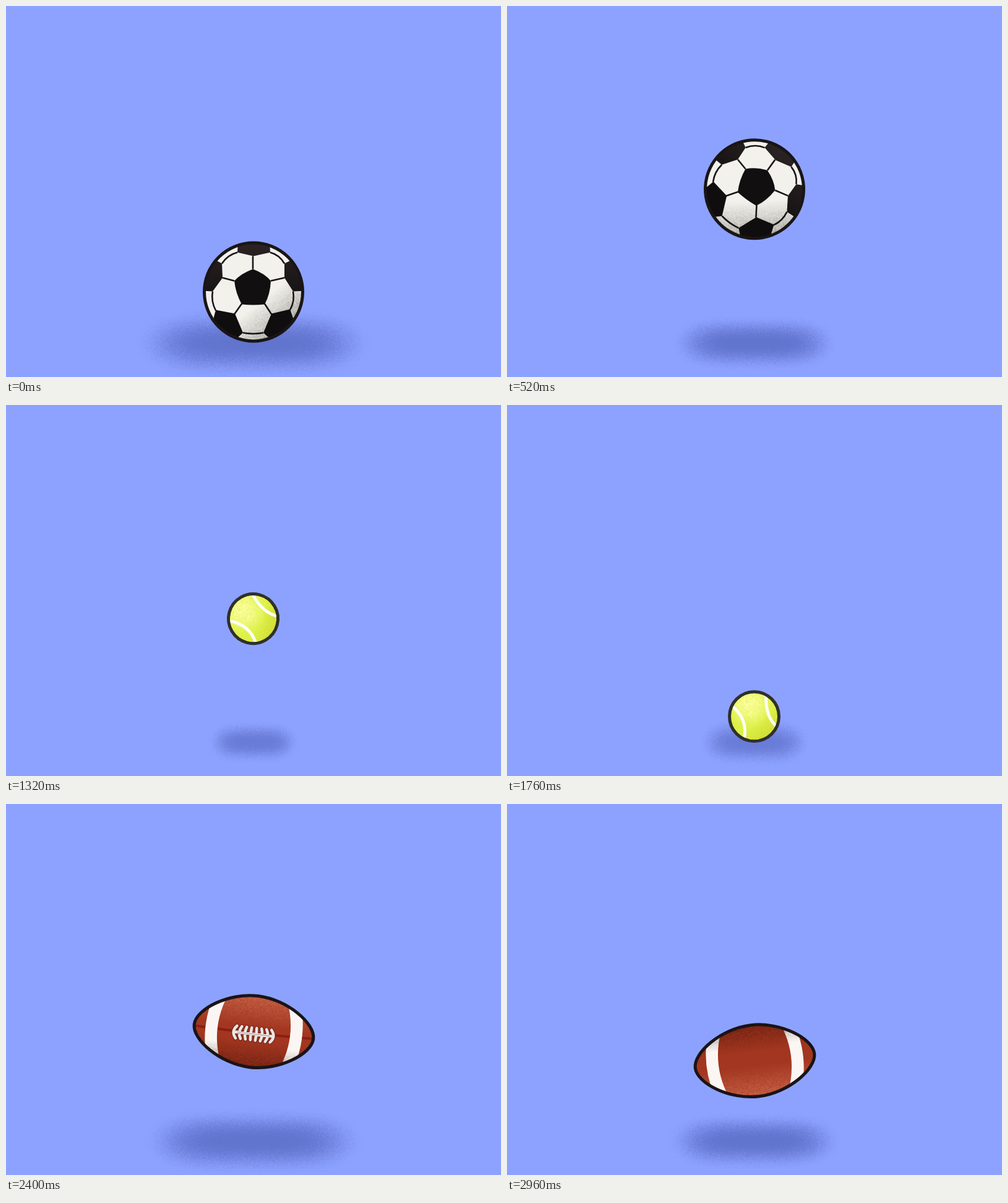
Recreate the animation shown at these times as an HTML page with a canvas. Size 800 by 600 pixels, loop 3000 ms.

```html
<!DOCTYPE html>
<html lang="en">
<head>
<meta charset="utf-8">
<title>Bouncing balls</title>
<style>
html, body { margin: 0; width: 100%; height: 100%; overflow: hidden; background: #8da2ff; }
canvas { display: block; }
</style>
</head>
<body>
<canvas id="stage" width="800" height="600"></canvas>
<script>
const ctx = document.getElementById('stage').getContext('2d');
const LOOP = 3000, STEP = 40, DEG = Math.PI / 180;
const BG = [141, 162, 255], SHADE = [97, 116, 206];

let seed = 7;
const rand = () => (seed = (seed * 16807) % 2147483647) / 2147483647;
const clamp = v => Math.max(0, Math.min(1, v));
const smooth = v => { v = clamp(v); return v * v * (3 - 2 * v); };

// Grainy shading sprite; fn gives the opacity at a point around the centre.
function grain(rgb, fn) {
  const c = document.createElement('canvas');
  c.width = c.height = 200;
  const g = c.getContext('2d'), img = g.createImageData(200, 200);
  for (let i = 0; i < 40000; i++) {
    const a = fn(i % 200 - 100, Math.floor(i / 200) - 100);
    img.data.set(rgb, i * 4);
    img.data[i * 4 + 3] = a > 0 ? 255 * clamp(a * (0.4 + 1.2 * rand())) : 0;
  }
  g.putImageData(img, 0, 0);
  return c;
}
const lay = s => ctx.drawImage(s, -100, -100);

const lowRight = (start, range, max) => (x, y) => max * clamp((x * 0.62 + y * 0.78 - start) / range);
const glow = (cx, cy, r, max) => (x, y) => max * smooth(1 - Math.hypot(x - cx, y - cy) / r);
const tex = {
  soccer: grain([95, 95, 88], lowRight(18, 70, 0.55)),
  basketDark: grain([140, 62, 30], lowRight(12, 70, 0.55)),
  basketLight: grain([255, 170, 120], glow(-34, -46, 75, 0.6)),
  tennisDark: grain([190, 190, 30], lowRight(10, 36, 0.45)),
  tennisLight: grain([255, 255, 165], glow(-8, -20, 46, 0.85)),
  volley: grain([120, 118, 100], lowRight(28, 80, 0.3)),
  ballDark: grain([70, 14, 4], (x, y) => 0.5 * clamp((y - 14) / 48)),
  ballLight: grain([235, 140, 110], (x, y) => 0.45 * clamp((-y - 8) / 52)),
  stripe: grain([110, 95, 85], (x, y) => 0.5 * clamp((y - 22) / 30))
};

function disc(r) {
  ctx.beginPath();
  ctx.arc(0, 0, r, 0, Math.PI * 2);
}

function poly(p, color) {
  ctx.beginPath();
  for (let i = 0; i < p.length; i += 2) ctx.lineTo(p[i], p[i + 1]);
  ctx.closePath();
  ctx.fillStyle = color;
  ctx.fill();
}

function shape(d, color) {
  ctx.fillStyle = color;
  ctx.fill(new Path2D(d));
}

function line(d, color, width) {
  ctx.strokeStyle = color;
  ctx.lineWidth = width;
  ctx.stroke(new Path2D(d));
}

function ramp(y0, y1, a, b) {
  const g = ctx.createLinearGradient(0, y0, 0, y1);
  g.addColorStop(0, a);
  g.addColorStop(1, b);
  return g;
}

// Round ball: clipped inside, then outlined.
function round(r, edge, width, fill, inside) {
  ctx.save();
  disc(r - 1);
  ctx.clip();
  ctx.fillStyle = fill;
  ctx.fill();
  inside();
  ctx.restore();
  disc(r - width / 2);
  ctx.strokeStyle = edge;
  ctx.lineWidth = width;
  ctx.stroke();
}

function soccer() {
  round(82, '#1a1516', 5, '#f2f1ec', () => {
    lay(tex.soccer);
    const ink = ramp(-80, 30, '#2b2324', '#100d0e');
    shape('M-1-37Q18-30 28-18Q27 4 18 20Q0 22-19 20Q-29 2-31-18Q-20-30-1-37Z', '#120f10');
    poly([-25, -82, -26, -64, 0, -58, 27, -64, 26, -82], ink);
    poly([50, -23, 50, -46, 62, -52, 84, -32, 84, -2, 64, -1], ink);
    poly([-50, -23, -51, -46, -62, -52, -84, -32, -84, -2, -66, -1], ink);
    poly([29, 35, 59, 28, 66, 48, 45, 72, 25, 74, 16, 66], ink);
    poly([-30, 35, -61, 29, -66, 48, -46, 72, -26, 74, -17, 66], ink);
    line('M-1-37V-58M28-18L50-23M18 19L29 36M-19 19L-31 36M-31-18L-50-23', '#1a1516', 2.6);
    line('M27-64Q42-60 50-46M-26-64Q-42-60-51-46M64-1Q67 15 59 29M-66-1Q-69 15-61 30M16 66Q0 69-17 66', '#1a1516', 2.6);
  });
}

function basket() {
  round(82, '#262221', 6, '#f56b3d', () => {
    lay(tex.basketLight);
    lay(tex.basketDark);
    line('M-74-27C-25-20 10 20 12 80M-32-73C0-38 30 0 44 70M53-62C40-30 42 15 68 44M-68 44C0 46 45 30 82-2', '#262221', 6.5);
  });
}

function tennis() {
  round(42.5, '#2f3029', 5, '#dcf045', () => {
    lay(tex.tennisLight);
    lay(tex.tennisDark);
    line('M-38-19Q-8 5-17 39M19-34Q18 2 38 18', '#fdfef4', 5);
  });
}

function volley() {
  round(91.5, '#1c1940', 5.5, '#e5e5da', () => {
    const gold = ctx.createLinearGradient(-60, -20, 85, 30);
    gold.addColorStop(0, '#ffcb1c');
    gold.addColorStop(0.7, '#ffc014');
    gold.addColorStop(1, '#ffa40c');
    shape('M-42-76Q-97-10-72 46L-95 44V-50Z', ramp(-75, 20, '#8279b8', '#2c2577'));
    shape('M-32-73Q21-76 74-46Q82-28 81-7Q11-45-57-39Q-48-60-32-73Z', '#fbfaf5');
    shape('M-63-35Q10-39 81-1Q80 20 72 38Q-5 37-71 2Q-70-18-63-35Z', gold);
    shape('M-72 9Q-5 42 69 45Q59 66 45 75Q-20 68-65 46Q-72 28-72 9Z', '#f5f4ee');
    poly([-67, 52, -33, 65, -38, 78, -62, 74], '#ffb514');
    poly([-28, 66, 4, 73, 3, 94, -36, 90], '#120e44');
    poly([8, 74, 38, 77, 20, 94, 7, 94], '#ffb010');
    poly([-26, -94, 2, -94, 1, -73, -36, -75], '#ffc91c');
    poly([7, -94, 45, -84, 38, -65, 7, -72], '#6a62a4');
    poly([47, -82, 78, -50, 42, -62], '#ffc91c');
    lay(tex.volley);
  });
}

const hull = new Path2D('M-97 0C-97-25-48-58 0-58C48-58 97-25 97 0C97 25 48 58 0 58C-48 58-97 25-97 0Z');
const stripe = 'M68-60Q89 0 68 60L46 60Q72 0 46-60Z';
const stripes = new Path2D(stripe);
stripes.addPath(new Path2D(stripe), new DOMMatrix([-1, 0, 0, 1, 0, 0]));

// The ball rolls about its long axis, so the laces travel over the top.
function football(t) {
  const roll = Math.PI * (t - 2400) / 560, face = Math.cos(roll);
  const shaded = (...sprites) => {
    ctx.save();
    ctx.globalAlpha = Math.abs(face);
    if (face < 0) ctx.scale(1, -1);
    sprites.forEach(lay);
    ctx.restore();
  };
  const front = (y, draw) => {
    if (face < 0.05) return;
    ctx.save();
    ctx.translate(0, y - 52 * Math.sin(roll));
    ctx.scale(1, face);
    draw();
    ctx.restore();
  };
  ctx.save();
  ctx.clip(hull);
  ctx.fillStyle = '#a23620';
  ctx.fillRect(-100, -62, 200, 124);
  shaded(tex.ballLight, tex.ballDark);
  front(0, () => line('M-97 2Q0 4 97 0', '#8c1d12', 4));
  ctx.fillStyle = '#fbf6f3';
  ctx.fill(stripes);
  ctx.save();
  ctx.clip(stripes);
  shaded(tex.stripe);
  ctx.restore();
  front(4, () => {
    ctx.lineCap = 'round';
    let laces = 'M-30 0H30';
    for (let i = 0; i < 8; i++) {
      const x = (i - 3.5) * 8, out = x * 0.16;
      laces += `M${x} -10Q${x + out * 2} 0 ${x} 10`;
    }
    line(laces, '#6b1c11', 6.5);
    line(laces, '#ece5e3', 4.6);
    line('M-26 0H26', '#b9a7a5', 1.4);
  });
  ctx.restore();
  ctx.strokeStyle = '#1a1416';
  ctx.lineWidth = 5;
  ctx.stroke(hull);
}

// Times in ms, heights and shadow half sizes in px, spin in degrees per ms.
const balls = [
  { draw: soccer, start: 0, top: 306, end: 601, x: 400, ground: 462.5, rise: 351, spin: 0.069, zero: 0, sw: 192, sh: 58 },
  { draw: basket, start: 601, top: 900, end: 1201, x: 402, ground: 463, rise: 303, spin: 0.069, zero: 1000, sw: 190, sh: 58 },
  { draw: tennis, start: 1201, top: 1482, end: 1760.5, x: 399.5, ground: 504.5, rise: 238, spin: 0.069, zero: 1760, sw: 90, sh: 40, tone: 0.82 },
  { draw: volley, start: 1760.5, top: 2077, end: 2342, x: 404, ground: 454, rise: 348.5, spin: 0.055, zero: 2040, sw: 194, sh: 58 },
  { draw: football, start: 2342, top: 2690, end: 2988.5, x: 400.5, ground: 484.5, rise: 381, spin: -14 / 560, zero: 2680, sw: 192, sh: 58, fade: 3035 }
];

const noise = Array.from({ length: 420 * 120 }, () => rand() - 0.5);

function shadow(b, t) {
  const p = (t - b.start) / ((b.fade || b.end) - b.start);
  const k = p < 0.65 ? Math.sin(Math.PI / 2 * p / 0.65) : 1 - Math.pow((p - 0.65) / 0.35, 3.5);
  const w = b.sw * (1 - 0.37 * k), h = b.sh * (1 - 0.25 * k), tone = b.tone || 1;
  const x0 = 190, y0 = 480, W = 420, H = 120;
  const img = ctx.createImageData(W, H);
  for (let i = 0; i < W * H; i++) {
    const dx = (i % W + x0 - 400) / w, dy = (Math.floor(i / W) + y0 - 545) / h;
    const d = Math.sqrt(dx ** 4 + dy * dy);
    const a = d > 1.1 ? 0 : tone * smooth((1 - d + 0.2 * noise[i]) / 0.9);
    for (let c = 0; c < 3; c++) img.data[i * 4 + c] = BG[c] + (SHADE[c] - BG[c]) * a;
    img.data[i * 4 + 3] = 255;
  }
  ctx.putImageData(img, x0, y0);
}

function render(t) {
  const b = balls.find(o => t < o.end) || balls[balls.length - 1];
  ctx.fillStyle = `rgb(${BG})`;
  ctx.fillRect(0, 0, 800, 600);
  shadow(b, t);
  const u = (t - b.top) / (t < b.top ? b.top - b.start : b.end - b.top);
  ctx.save();
  ctx.translate(b.x, b.ground - b.rise * (1 - u * u));
  ctx.rotate(b.spin * (t - b.zero) * DEG);
  b.draw(t);
  ctx.restore();
}

const begin = performance.now();
let last = -1;
function tick() {
  const t = Math.floor(((performance.now() - begin) % LOOP) / STEP) * STEP;
  if (t !== last) render(last = t);
  requestAnimationFrame(tick);
}
tick();
</script>
</body>
</html>
```
